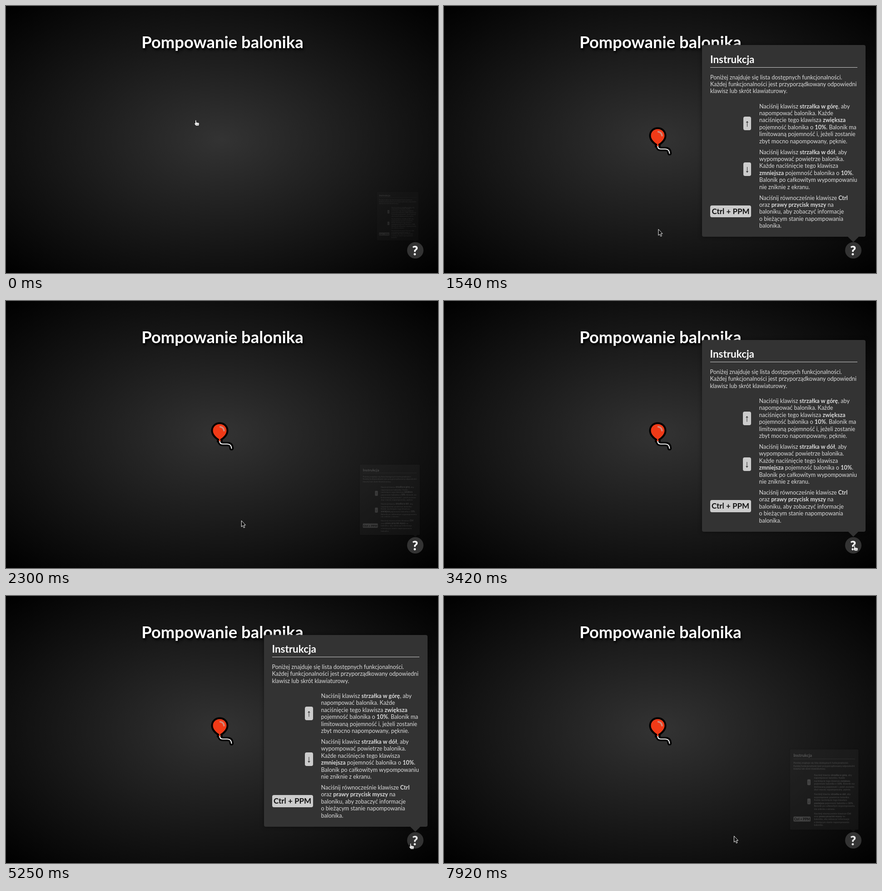
An HTML page for the animation above (7.99 s loop, 951 px wide and 589 px high).

```html
<!DOCTYPE html>
<html lang="pl">
<head>
<meta charset="utf-8">
<title>Pompowanie balonika</title>
<style>
@property --s { syntax: "<number>"; inherits: false; initial-value: 0; }
:root { --loop: 7990ms; }
html, body { margin: 0; width: 100%; height: 100%; overflow: hidden; background: #000; }
body { position: relative; font-family: Lato, sans-serif; background: radial-gradient(#333, #000); }
body::after { content: ""; position: absolute; inset: auto 0 0; height: 1px; background: #000; }
h1, h2, p, kbd, svg, .panel, .help, .help b, .cursor { position: absolute; margin: 0; white-space: nowrap; }
h1 { left: 1px; width: 100%; top: 57px; text-align: center; font: 700 36.4px/44px Lato, sans-serif; color: #fff; text-shadow: 2px 4px 5px #000; }
.balloon { left: 445px; top: 260px; transform-origin: 31px 38px; animation: inflate var(--loop) infinite; }

.panel {
  left: 567.5px; top: 85.5px; width: 360px; height: 423px; border-radius: 4px;
  background: #333; color: #ddd; font-size: 12.56px; line-height: 15.4px;
  box-shadow: 0 0 8px rgba(0, 0, 0, .5);
  transform-origin: 333px 434px; transform: scale(var(--s));
  opacity: calc(var(--s) * (.35 + .65 * var(--s)));
  animation: panel var(--loop) infinite;
}
.panel::after { content: ""; position: absolute; left: 321px; top: 422.5px; border: 12px solid transparent; border-top-color: #333; border-bottom: 0; }
h2 { left: 18px; top: 17.5px; width: 324px; height: 31px; border-bottom: 1px solid #ccc; font-size: 22.4px; line-height: 27px; color: #fff; }
.panel p { left: 126px; }
.panel .intro { left: 18px; top: 63.5px; }
kbd { right: 252px; box-sizing: border-box; border-radius: 4px; background: #ccc; color: #111; text-align: center; font: 700 17px/26px Lato, sans-serif; }
.arrow { width: 17.5px; height: 30px; font: 400 21px/30px "Liberation Sans", sans-serif; }
.wide { width: 90px; height: 26.5px; }

.help { left: 882.5px; top: 520.5px; width: 36px; height: 36px; border-radius: 50%; background: #333; color: #fff; }
.help b { inset: 0; text-align: center; font-weight: 900; line-height: 36px; }
.ask { font-size: 28px; animation: ask var(--loop) infinite step-end; }
.close { font-size: 19.5px; opacity: 0; animation: close var(--loop) infinite step-end; }

.cursor { left: 0; top: 0; animation: move var(--loop) infinite linear; }
.cursor svg { overflow: visible; }
.hand { animation: hand var(--loop) infinite step-end; }
.pointer { animation: pointer var(--loop) infinite step-end; }

@keyframes inflate {
  0%, .6% { transform: scale(0); opacity: 0; }
  10%, 100% { transform: none; opacity: 1; }
}
@keyframes panel {
  0% { --s: .25; animation-timing-function: ease-out; }
  5.01%, 26.88% { --s: 1; animation-timing-function: ease; }
  32.1% { --s: 0; animation-timing-function: ease; }
  37.36%, 45.93% { --s: 1; animation-timing-function: ease; }
  51.19%, 59.29% { --s: 0; animation-timing-function: ease; }
  64.54% { --s: 1; }
  97.36% { --s: 1; animation-timing-function: cubic-bezier(.35, .087, .4545, .6625); }
  100% { --s: .197; }
}
@keyframes ask {
  0% { opacity: 1; }
  59.3% { opacity: .88; }
  68.2% { opacity: 0; }
  95.7%, 100% { opacity: .88; }
}
@keyframes close { 0% { opacity: 0; } 68.2% { opacity: 1; } 95.7%, 100% { opacity: 0; } }
@keyframes hand {
  0%, 32.1%, 59.3%, 88.2% { opacity: 1; }
  11.1%, 46.1%, 71.3%, 97.2%, 100% { opacity: 0; }
}
@keyframes pointer {
  0%, 32.1%, 59.3%, 88.2% { opacity: 0; }
  11.1%, 46.1%, 71.3%, 97.2%, 100% { opacity: 1; }
}
@keyframes move {
  0%, 10.89% { transform: translate(418px, 251px); animation-timing-function: ease-in-out; }
  19.1%, 21.28% { transform: translate(471.5px, 492px); }
  28.79% { transform: translate(517px, 484px); }
  29.66% { transform: translate(600px, 490px); }
  31.29% { transform: translate(850px, 510px); }
  32.17% { transform: translate(912px, 535px); }
  33.04%, 39.17% { transform: translate(919px, 537px); }
  39.55%, 41.68% { transform: translate(916px, 537px); }
  42.8%, 45.93% { transform: translate(904px, 538px); }
  47.56%, 52.94% { transform: translate(872px, 534px); }
  55.44% { transform: translate(847px, 545px); }
  57.07% { transform: translate(846px, 546px); }
  59.32% { transform: translate(886px, 546px); }
  65.71%, 70.09% { transform: translate(891px, 545px); }
  71.59% { transform: translate(860px, 548px); }
  72.47% { transform: translate(806px, 550px); }
  73.34% { transform: translate(700px, 549px); }
  74.22%, 79.85% { transform: translate(630px, 542px); }
  81.6% { transform: translate(690px, 566px); }
  84.98%, 87.23% { transform: translate(879px, 545px); }
  87.48% { transform: translate(882px, 545px); }
  89.99%, 93.12% { transform: translate(890px, 545px); }
  93.24%, 94.87% { transform: translate(884px, 538px); }
  97.25% { transform: translate(878px, 538px); }
  98.25% { transform: translate(760px, 535px); }
  99.12%, 100% { transform: translate(638px, 529px); }
}
</style>
</head>
<body>
<h1>Pompowanie balonika</h1>

<svg class="balloon" width="64" height="76" fill="none" stroke-linecap="round" stroke-linejoin="round">
  <defs>
    <path id="string" d="M25.5 49C25.5 53 28 55.5 32 55.5H42Q51 55.5 51.5 65"/>
    <path id="skin" d="M25.5 11.5C34.5 11.5 40.5 18 40.5 26C40.5 34 33 41 26.5 45L28 49H23L24.5 45C18 41 10.5 34 10.5 26C10.5 18 16.5 11.5 25.5 11.5Z"/>
  </defs>
  <use href="#string" stroke="#000" stroke-width="9.5"/>
  <use href="#skin" stroke="#000" stroke-width="8"/>
  <use href="#string" stroke="#fff" stroke-width="2.2"/>
  <use href="#skin" fill="#f03a17"/>
  <path d="M26.5 17.5Q34 18.5 35 26" stroke="#d5897b" stroke-width="3.5"/>
</svg>

<section class="panel">
  <h2>Instrukcja</h2>
  <p class="intro">Poniżej znajduje się lista dostępnych funkcjonalności.<br>Każdej funkcjonalności jest przyporządkowany odpowiedni<br>klawisz lub skrót klawiaturowy.</p>
  <kbd class="arrow" style="top:158px">↑</kbd>
  <p style="top:127.5px">Naciśnij klawisz <b>strzałka w górę</b>, aby<br>napompować balonika. Każde<br>naciśnięcie tego klawisza <b>zwiększa</b><br>pojemność balonika o <b>10%</b>. Balonik ma<br>limitowaną pojemność i, jeżeli zostanie<br>zbyt mocno napompowany, pęknie.</p>
  <kbd class="arrow" style="top:259px">↓</kbd>
  <p style="top:228.5px">Naciśnij klawisz <b>strzałka w dół</b>, aby<br>wypompować powietrze balonika.<br>Każde naciśnięcie tego klawisza<br><b>zmniejsza</b> pojemność balonika o <b>10%</b>.<br>Balonik po całkowitym wypompowaniu<br>nie zniknie z ekranu.</p>
  <kbd class="wide" style="top:353.5px">Ctrl + PPM</kbd>
  <p style="top:329.5px">Naciśnij równocześnie klawisze <b>Ctrl</b><br>oraz <b>prawy przycisk myszy</b> na<br>baloniku, aby zobaczyć informacje<br>o bieżącym stanie napompowania<br>balonika.</p>
</section>

<div class="help"><b class="ask">?</b><b class="close">X</b></div>

<div class="cursor">
  <svg class="pointer" width="12" height="19"><path d="M.5.5V14L3.5 11.2L5.6 16.2L7.8 15.2L5.7 10.3H9.5Z" fill="#000" stroke="#fff"/></svg>
  <svg class="hand" width="14" height="15">
    <path d="M-1.5 1.5Q0-.5 1 1.5V5L6 6Q8 6.5 7.5 9L6.5 13.5H0L-3.5 8.5Q-3.5 6.5-1.5 8Z" fill="#fff" stroke="#000" stroke-width=".8"/>
    <path d="M1.8 5V8M3.8 5.5V8M5.8 6V8.5M1 10V12M3 10V12M5 10V12" stroke="#000" stroke-width=".6"/>
  </svg>
</div>
</body>
</html>
```
